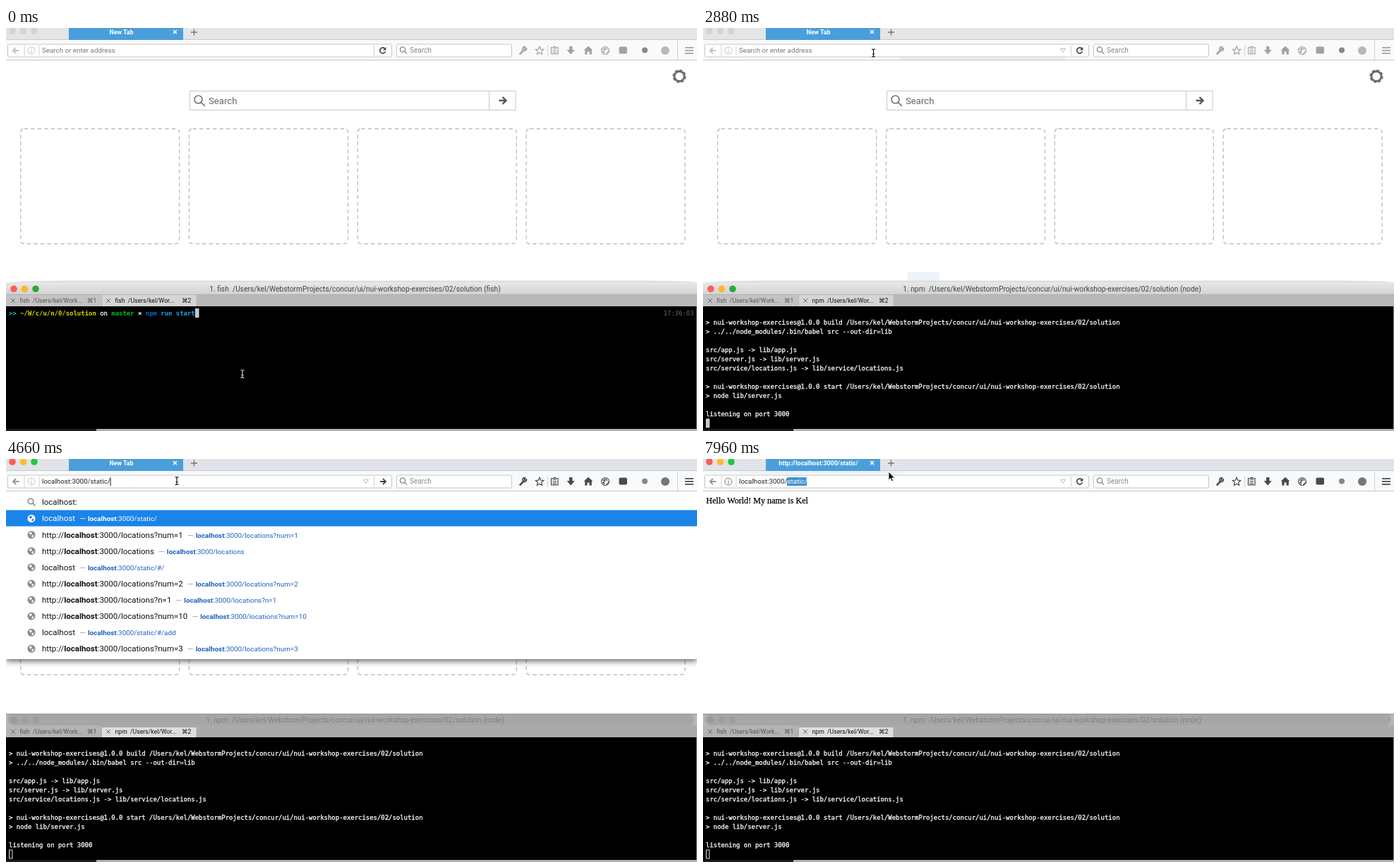
Write an HTML page that moves like this. It is 979 by 572 pixels and loops after 8 s.

```html
<!DOCTYPE html>
<html lang="en">
<head>
<meta charset="utf-8">
<title>Starting a local server</title>
<style>
  html, body { margin: 0; height: 100%; overflow: hidden; background: #fff; }
  svg { display: block; width: 100vw; height: 100vh; }
  text { font-family: Roboto, "DejaVu Sans", sans-serif; white-space: pre; }
  .mono { font: 8.95px "DejaVu Sans Mono", monospace; fill: #fff; }
  .output { stroke: #fff; stroke-width: .3px; }
  .serif { font: 12.12px "Liberation Serif", serif; stroke: #000; stroke-width: .25px; }
  .line { fill: none; stroke: currentColor; }
  .popup { filter: drop-shadow(0 3px 4px #0009); }
</style>
</head>
<body>
<svg id="stage" viewBox="0 0 979 572"></svg>
<script>
const LOOP = 8000;
const FOCUS = 3030, ACTIVE = 3180, TYPED = 3760, POPUP = 4660, LOADING = 5260, LOADED = 5410, SELECTED = 6760;

// Markup visible only from one time up to another.
const show = (from, to, ...parts) => `<g data-from="${from}" data-to="${to}">${parts.join('')}</g>`;
const rect = (x, y, w, h, fill, extra = '') =>
  `<rect x="${x}" y="${y}" width="${w}" height="${h}" fill="${fill}" ${extra}/>`;
const circle = (x, y, r, fill, extra = '') => `<circle cx="${x}" cy="${y}" r="${r}" fill="${fill}" ${extra}/>`;
const path = (d, width = 1.3, extra = '') => `<path class="line" d="${d}" stroke-width="${width}" ${extra}/>`;
const solid = d => `<path d="${d}" fill="currentColor"/>`;
const text = (x, y, size, fill, content, extra = '') =>
  `<text x="${x}" y="${y}" font-size="${size}" fill="${fill}" ${extra}>${content}</text>`;
const tinted = (color, ...parts) => `<g color="${color}">${parts.join('')}</g>`;
const at = (x, y, content) => `<g transform="translate(${x} ${y})">${content}</g>`;
const lights = (x, y, colors) => colors.map((c, i) => circle(x + i * 15.5, y, 4.8, c)).join('');
const magnifier = (x, y, r, width) =>
  path(`M${x - r} ${y}a${r} ${r} 0 1 0 ${2 * r} 0a${r} ${r} 0 1 0 ${-2 * r} 0M${x + r * .7} ${y + r * .7}l${r} ${r}`, width);
const arrowRight = (x, y, s, width) => path(`M${x - s} ${y}h${2 * s - 1}M${x} ${y - s}l${s} ${s}l${-s} ${s}`, width);

const RGB_LIGHTS = ['#fc5b57', '#fdbb2d', '#28c43f'];

/* Browser chrome */

function toolbarIcons() {
  const dots = [0, 1, 2].map(i => `M774.5 ${29.5 + i * 2.8}h5.5`).join('');
  return [
    path('M728.5 36.5l5-5', 2.6, 'stroke-linecap="round"'),
    path('M737.4 28.3l-2 2l-1.6-1.6l2-2a3 3 0 1 0 1.6 1.6', 1.5),
    path('M756 26.3l1.7 3.8l4 .4l-3 2.8l.9 4l-3.6-2.1l-3.6 2.1l.9-4l-3-2.8l4-.4z', 1.2),
    path(`M772.5 27.5h9.5v9.5h-9.5z${dots}M775.5 26.5h3.5`, 1.2),
    solid('M798 26h4.4v5h3.4l-5.6 6.4l-5.6-6.4h3.4z'),
    solid('M825 25.8l6.4 5.8h-1.6v5.8h-3.3v-4h-3v4h-3.3v-5.8h-1.6z'),
    path('M843.5 32a5.5 5.5 0 1 0 11 0a5.5 5.5 0 1 0 -11 0M844 30h9M844.5 35l7-8M848 26.5l-1 10M850 37l4.5-5', 1.1),
    rect(868.5, 26.5, 11.5, 10, 'currentColor', 'rx="2"'),
    circle(905, 31.5, 4, '#888'),
    circle(934, 32, 6, 'currentColor', 'opacity=".75"'),
    path('M962 27.8h12M962 31.8h12M962 35.8h12', 1.8)
  ].join('');
}

function chrome() {
  const bar = (strip, tool) => rect(0, 0, 979, 16, strip) + rect(0, 16, 979, 30, tool);
  const divider = (x, y, h) => rect(x, y, 1, h, '#cfcfcf');
  const field = (x, w) => rect(x, 23, w, 18, '#fff', 'stroke="#c6c6c6" rx="2"');
  const info = color => tinted(color, path('M31 32a5 5 0 1 0 10 0a5 5 0 1 0 -10 0M36 31v4M36 28.8v1.2', 1));
  const tabTitle = s => text(163.5, 8.8, 8.9, '#fff', s, 'text-anchor="middle" font-weight="700"');
  const reload = tinted('#444', path('M537 29.6a4 4 0 1 0 .5 3.6', 1.6), solid('M538.4 27v4.4h-4.4z'));
  return [
    show(0, ACTIVE, bar('#e4e5e6', '#fafafa'), lights(9, 4, ['#d3d3d3', '#d3d3d3', '#d3d3d3'])),
    show(ACTIVE, LOOP, bar('#e0e3e7', '#f8f9fb'), lights(9, 4, RGB_LIGHTS)),
    rect(0, 16, 979, 1, '#cbcbcb'), rect(0, 45, 979, 1, '#c6c6c6'),
    rect(89, 0, 162, 17, '#4a9eda'),
    show(0, LOADING, tabTitle('New Tab')),
    show(LOADING, LOOP, tabTitle('http://localhost:3000/static/')),
    tinted('#fff', path('M237 3l5 5M242 3l-5 5', 1.5)),
    tinted('#777', path('M262 6h9M266.5 1.5v9', 1.4)),
    show(2880, FOCUS, rect(280, 41.5, 234, 3.5, '#e9eff6')),
    show(SELECTED, LOOP, rect(51, 17, 231, 4, '#edf2f8')),
    field(2.5, 544), field(553.5, 163),
    divider(25.5, 23, 18), divider(46.5, 25, 14), divider(521, 25, 14), divider(767, 24, 16), divider(951, 18, 27),
    show(0, ACTIVE, tinted('#c4c4c4', path('M18.5 32h-8M14 28l-4 4l4 4', 2))),
    show(ACTIVE, LOOP, tinted('#999', path('M18.5 32h-8M14 28l-4 4l4 4', 2))),
    show(0, LOADED, info('#c2c2c2')), show(LOADED, LOOP, info('#777')),
    show(2880, LOOP, tinted('#bbb', path('M506.5 29.5h7l-3.5 5z', 1))),
    show(0, TYPED, reload), show(LOADING, LOOP, reload),
    show(TYPED, LOADING, tinted('#444', arrowRight(534, 32, 4, 1.8))),
    tinted('#888', magnifier(562, 30.5, 3.6, 1.4)),
    text(572, 35.3, 10, '#888', 'Search'),
    show(0, ACTIVE, tinted('#a2a2a2', toolbarIcons())),
    show(ACTIVE, LOOP, tinted('#4a4a4a', toolbarIcons()))
  ].join('');
}

function address() {
  const url = (s, fill = '#222') => text(51, 35.3, 9.8, fill, s);
  const caret = x => rect(x, 26, 1, 12, '#111');
  const marked = (x, w) => rect(x, 26, w, 12, '#4093d3');
  const white = s => `<tspan fill="#fff">${s}</tspan>`;
  return [
    show(0, TYPED, url('Search or enter address', '#777')),
    show(TYPED, POPUP, url('localhost/'), caret(94)),
    show(POPUP, LOADING, url('localhost:3000/static/'), caret(147.5)),
    show(LOADING, SELECTED, url('localhost<tspan fill="#808080">:3000/static/</tspan>')),
    show(SELECTED, 7660, marked(51, 96), url(white('localhost:3000/static/'))),
    show(7660, LOOP, marked(119, 28), url('localhost:3000/' + white('static/')))
  ].join('');
}

/* Page content */

function newTabPage() {
  const tiles = [0, 1, 2, 3].map(i =>
    rect(20.7 + i * 238.8, 143, 225, 163.3, 'none', 'rx="5" stroke="#bfbfbf" stroke-width="1.4" stroke-dasharray="5.5 4"')).join('');
  return tiles +
    rect(260.5, 89.5, 461.5, 27, '#fff', 'stroke="#c3cbcb"') + rect(684, 90, 1, 26, '#c3cbcb') +
    tinted('#777', magnifier(272.5, 101.5, 5.5, 1.7)) +
    text(287, 108, 13.2, '#666', 'Search') +
    tinted('#555', arrowRight(703.5, 103, 5, 2.4)) +
    circle(954, 68.5, 7, 'none', 'stroke="#6c6c6c" stroke-width="2.8"') +
    circle(954, 68.5, 8.7, 'none', 'stroke="#6c6c6c" stroke-width="1.8" stroke-dasharray="4 2.833"');
}

function suggestions() {
  const num = n => `locations?num=${n}`;
  const rows = ['static/', num(1), 'locations', 'static/#/', num(2), 'locations?n=1', num(10), 'static/#/add', num(3)];
  const host = '<tspan font-weight="700">localhost</tspan>';
  const globe = (y, land) => circle(36, y, 5.5, 'currentColor') +
    `<path d="M32.5 ${y - 2.5}l3-1.5l1.5 2.5l-2.5 2zM36.5 ${y + 1}l3-1l-1 3.5l-2 .5z" fill="${land}"/>`;
  const row = (page, i) => {
    const y = 84.4 + i * 23.12, picked = i === 0;
    const title = page.startsWith('static') ? 'localhost' : `http://${host}:3000/${page}`;
    const link = `<tspan dx="3.3" font-size="9.9" fill="${picked ? '#fff' : '#1e62bd'}">${host}:3000/${page}</tspan>`;
    const dash = `<tspan dx="6.5" font-size="10.5" fill="${picked ? '#fff' : '#999'}">—</tspan>`;
    return (picked ? rect(0, 72.5, 979, 23, '#1a84e9') : '') +
      tinted(picked ? '#fff' : '#8b8b8b', globe(y, picked ? '#1a84e9' : '#fff')) +
      text(51, y + 4, 11.48, picked ? '#fff' : '#111', title + dash + link);
  };
  return rect(0, 46, 979, 238, '#fff', 'class="popup"') +
    tinted('#888', magnifier(35, 60, 3.8, 1.6)) +
    text(51, 65.4, 11.48, '#111', 'localhost:') + rows.map(row).join('');
}

/* Terminal */

const FOLDER = '/Users/kel/WebstormProjects/concur/ui/nui-workshop-exercises/02/solution';
const script = name => `&gt; nui-workshop-exercises@1.0.0 ${name} ${FOLDER}`;
const ink = (fill, s) => `<tspan fill="${fill}" stroke="none" font-weight="700">${s}</tspan>`;
const LOG = [
  ink('#19c8d8', '&gt;&gt;') + ' ' + ink('#d8d800', '~/W/c/u/n/0/solution') + ' on ' + ink('#00c21c', 'master') +
    ' × ' + ink('#0a66d8', 'npm') + ' ' + ink('#18a8f0', 'run start'),
  '', script('prestart'), '&gt; npm run build', '', '',
  script('build'), '&gt; ../../node_modules/.bin/babel src --out-dir=lib', '',
  'src/app.js -&gt; lib/app.js', 'src/server.js -&gt; lib/server.js',
  'src/service/locations.js -&gt; lib/service/locations.js', '',
  script('start'), '&gt; node lib/server.js', '', 'listening on port 3000'
];

function terminalLog() {
  const rowTop = row => 398 + row * 13.04;
  const print = count => {
    const scroll = Math.max(0, count - 12);
    const stamp = scroll ? '' : `<text class="mono" x="974.5" y="407.5" text-anchor="end" style="fill:#666">17:36:03</text>`;
    return stamp + LOG.slice(scroll, count).map((s, i) =>
      s && `<text class="mono output" x="4" y="${Math.round(rowTop(i) + 9.5)}">${s}</text>`).join('');
  };
  const block = (x, row) => rect(x, rowTop(row), 5.5, 13, '#c9c9c9');
  const steps = [[500, 1], [800, 5], [1240, 9], [1840, 11], [1980, 16], [2130, 17]];
  return show(0, 500, print(1), block(268, 0)) +
    steps.map(([from, count], i) => show(from, steps[i + 1]?.[0] ?? LOOP, print(count),
      show(from, FOCUS, block(4, Math.min(count, 12))))).join('') +
    show(FOCUS, LOOP, rect(4.5, rowTop(12) + .5, 4.5, 12, 'none', 'stroke="#ddd"'));
}

function terminal() {
  const title = (fill, program, job) =>
    text(494.5, 374.3, 10.29, fill, `1. ${program}  ${FOLDER} (${job})`, 'text-anchor="middle"');
  const tab = (x, fill, label, key, keyX) =>
    tinted('#666', path(`M${x} 384l6 6M${x + 6} 384l-6 6`, 1)) +
    text(x + 12.5, 390.3, 8.67, fill, label) + text(keyX, 390.3, 8.6, fill, key);
  const tabBar = (first, second, rest, secondTop) => rect(0, 378, 979, 18, rest) +
    rect(0, 378, 135, 18, first) + rect(136, secondTop, 133.5, 396 - secondTop, second);
  return [
    '<defs><linearGradient id="lit" x2="0" y2="1"><stop stop-color="#e8e8e8"/>' +
      '<stop offset="1" stop-color="#d2d2d2"/></linearGradient></defs>',
    show(0, FOCUS,
      '<path d="M0 362Q20 358.5 90 358.5H900Q965 358.5 979 361V364H0z" fill="#dedede"/>',
      rect(0, 361, 979, 17, 'url(#lit)'), tabBar('#c3c3c3', '#d5d5d5', '#b9b9b9', 378), rect(0, 378, 979, .7, '#aaa'),
      lights(11, 370.3, ['#f95f57', '#fab62d', '#2ba93c'])),
    show(FOCUS, LOOP,
      rect(0, 362, 979, 16, '#b8b8b8'), rect(2, 362, 973, 16, '#a6a6a6', 'rx="8"'),
      tabBar('#b3b3b3', '#dedede', '#aaa', 381), rect(0, 361.5, 979, 1, '#888'),
      lights(11, 370.3, ['#999', '#9d9d9d', '#9d9d9d'])),
    show(0, 500, title('#444', 'fish', 'fish')),
    show(500, 1240, title('#444', 'npm', 'fish')),
    show(1240, FOCUS, title('#444', 'npm', 'node')),
    show(FOCUS, LOOP, title('#808080', 'npm', 'node')),
    tab(7, '#555', 'fish  /Users/kel/Work...', '⌘1', 115),
    show(0, 500, tab(142, '#111', 'fish  /Users/kel/Wor...', '⌘2', 249)),
    show(500, LOOP, tab(142, '#111', 'npm  /Users/kel/Wor...', '⌘2', 249)),
    rect(0, 395, 978, 175, '#000'), rect(978, 395, 1, 175, '#888'),
    rect(0, 569, 128, 3, '#1c1c1c'), rect(128, 569, 851, 3, '#b0b0b0'),
    terminalLog()
  ].join('');
}

/* Mouse pointer */

function pointer() {
  const stem = 'M-2.5 -5.5Q0 -5.5 0 -4V4Q0 5.5 -2.5 5.5M2.5 -5.5Q0 -5.5 0 -4M0 4Q0 5.5 2.5 5.5M-1.5 1.5h3';
  const lightBeam = tinted('#ddd', path(stem, 1.1));
  const darkBeam = tinted('#fff', path(stem, 2.6)) + tinted('#111', path(stem, 1.2));
  const arrow = '<path d="M0 0V12L2.8 9.5L4.6 13.8L6.6 13L4.8 8.9H8.5z" fill="#111" stroke="#fff" stroke-width=".8"/>';
  const stops = [
    [0, 335, 491, lightBeam], [1840, 339, 484, lightBeam], [1980, 338, 455, lightBeam], [2130, 331, 380, darkBeam],
    [2280, 291, 281, arrow], [2430, 271, 201, arrow], [2580, 251, 49, arrow],
    [2880, 241.5, 35.5, darkBeam], [FOCUS, 242, 31, darkBeam], [6610, 250, 21.5, arrow], [SELECTED, 263, 18, arrow]
  ];
  return stops.map(([from, x, y, shape], i) => show(from, stops[i + 1]?.[0] ?? LOOP, at(x, y, shape))).join('');
}

const stage = document.getElementById('stage');
stage.innerHTML = [
  rect(0, 0, 979, 572, '#fff'),
  show(0, LOADING, newTabPage()),
  show(LOADED, LOOP, '<text class="serif" x="4.5" y="63">Hello World! My name is Kel</text>'),
  show(2280, FOCUS, rect(290, 346.5, 45, 14, '#edf2f9')),
  show(TYPED, 3910, rect(0, 46, 979, 29, '#fff', 'class="popup"')),
  show(POPUP, LOADING, suggestions()),
  chrome(), address(), terminal(), pointer()
].join('');

const timed = [...stage.querySelectorAll('[data-from]')].map(node =>
  ({ node, from: +node.dataset.from, to: +node.dataset.to }));

function draw() {
  const t = performance.now() % LOOP;
  for (const { node, from, to } of timed) node.style.display = t >= from && t < to ? '' : 'none';
  requestAnimationFrame(draw);
}
draw();
</script>
</body>
</html>
```
